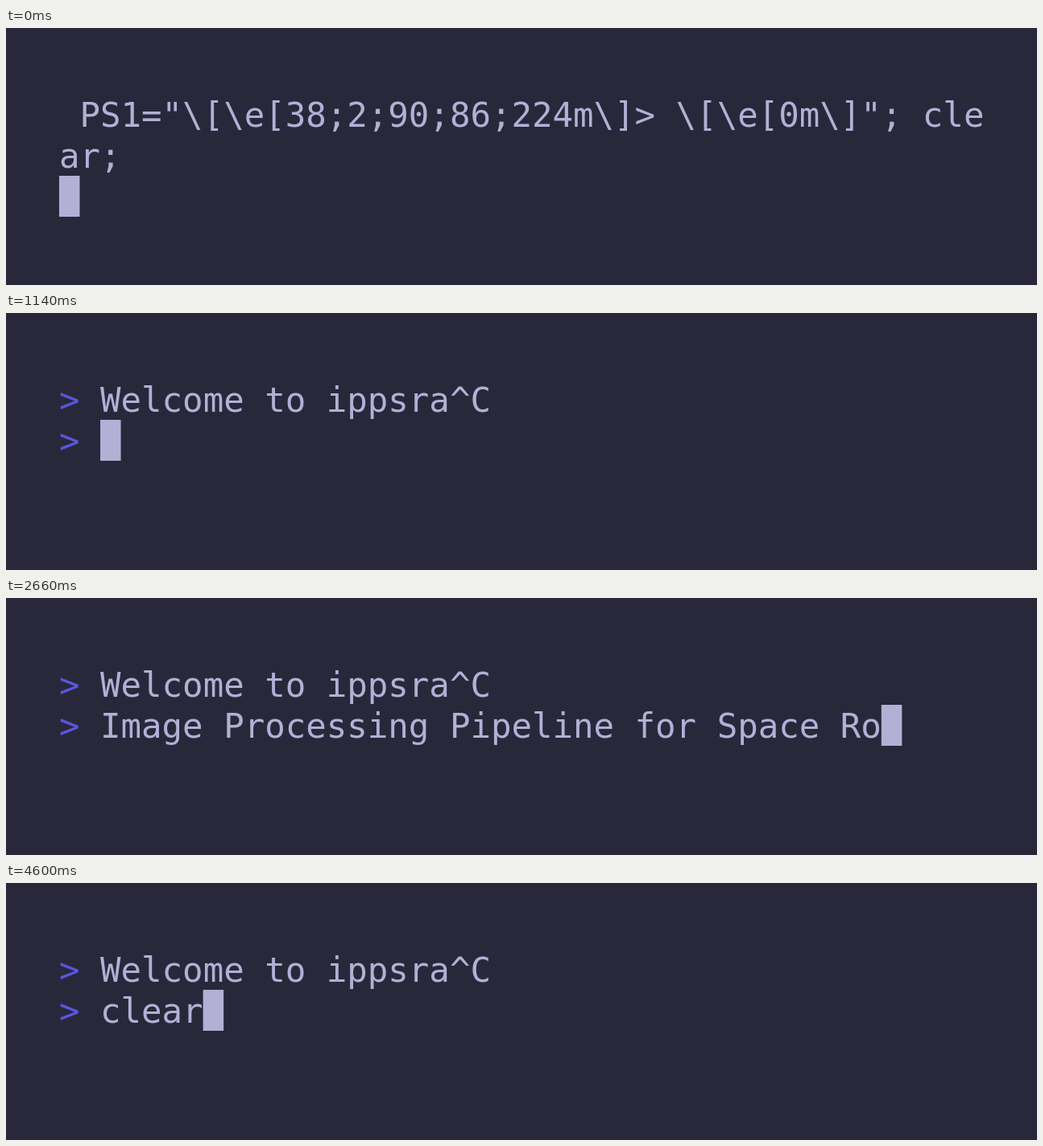
Animation, 1280 px wide and 320 px high, one loop 4.98 s. Source, as an HTML page with a canvas:

```html
<!DOCTYPE html>
<html lang="en">
<head>
<meta charset="utf-8">
<title>Terminal typing</title>
<style>
  html, body { margin: 0; width: 100%; height: 100%; overflow: hidden; background: #29283b; }
  canvas { display: block; }
</style>
</head>
<body>
<canvas id="screen" width="1280" height="320"></canvas>
<script>
const LOOP = 4980, TICK = 20, COLUMNS = 45;
const LEFT = 66, TOP = 82, CELL_W = 25.52, CELL_H = 51, BASELINE = 41;
const BACKGROUND = '#29283b', FOREGROUND = '#b3b0d6', PROMPT = '#5a56e0';

const SETUP = String.raw` PS1="\[\e[38;2;90;86;224m\]> \[\e[0m\]"; clear;`;
const WELCOME = 'Welcome to ippsra';
const TAGLINE = 'Image Processing Pipeline for Space Robotic Applications';

// Typing pace: [time in ms, characters typed by then]
const WELCOME_PACE = [[0, 0], [540, 9], [600, 10], [860, 17]];
const TAGLINE_PACE = [[1560, 0], [1580, 1], [2100, 23], [2140, 24], [2200, 25],
  [2260, 26], [2660, 38], [2720, 39], [3220, 53], [3280, 54], [3380, 56]];
const CLEAR_PACE = [[4400, 0], [4600, 5]];

const ctx = document.getElementById('screen').getContext('2d');

function typedCount(pace, t) {
  if (t <= pace[0][0]) return pace[0][1];
  for (let i = 1; i < pace.length; i++) {
    const [t0, n0] = pace[i - 1], [t1, n1] = pace[i];
    if (t < t1) return Math.floor(n0 + (n1 - n0) * (t - t0) / (t1 - t0) + 1e-6);
  }
  return pace[pace.length - 1][1];
}

function drawText(text, row, start = 0, color = FOREGROUND) {
  ctx.fillStyle = color;
  [...text].forEach((char, i) => {
    const cell = start + i;
    const line = row + Math.floor(cell / COLUMNS);
    ctx.fillText(char, LEFT + (cell % COLUMNS) * CELL_W, TOP + line * CELL_H + BASELINE);
  });
}

function drawCursor(cell, row) {
  const line = row + Math.floor(cell / COLUMNS);
  ctx.fillStyle = FOREGROUND;
  ctx.fillRect(LEFT + (cell % COLUMNS) * CELL_W, TOP + line * CELL_H, CELL_W, CELL_H);
}

function drawPrompt(text, row) {
  drawText('>', row, 0, PROMPT);
  drawText(text, row, 2);
}

function secondLine(t) {
  if (t >= 4060) return 'clear'.slice(0, typedCount(CLEAR_PACE, t));
  const count = typedCount(TAGLINE_PACE, t);
  // The last column and the wrapped space appear together.
  return TAGLINE.slice(0, count === 43 ? 44 : count);
}

function draw(t) {
  ctx.fillStyle = BACKGROUND;
  ctx.fillRect(0, 0, 1280, 320);
  ctx.font = '42.4px "DejaVu Sans Mono", monospace';

  if (t < 20) {
    drawText(SETUP, 0);
    drawCursor(0, 2);
  } else if (t < 1140) {
    const text = WELCOME.slice(0, typedCount(WELCOME_PACE, t));
    drawPrompt(text, 0);
    if (t < 1120) drawCursor(2 + text.length, 0);
    else drawCursor(2, 1);
  } else {
    const text = secondLine(t);
    drawPrompt(WELCOME + '^C', 0);
    drawPrompt(text, 1);
    const blinkedOff = t >= 3700 && t < 4020;
    if (!blinkedOff) drawCursor(2 + text.length, 1);
  }
}

const began = performance.now();
function frame() {
  const t = (performance.now() - began) % LOOP;
  draw(Math.floor(t / TICK) * TICK);
  requestAnimationFrame(frame);
}
frame();
</script>
</body>
</html>
```
